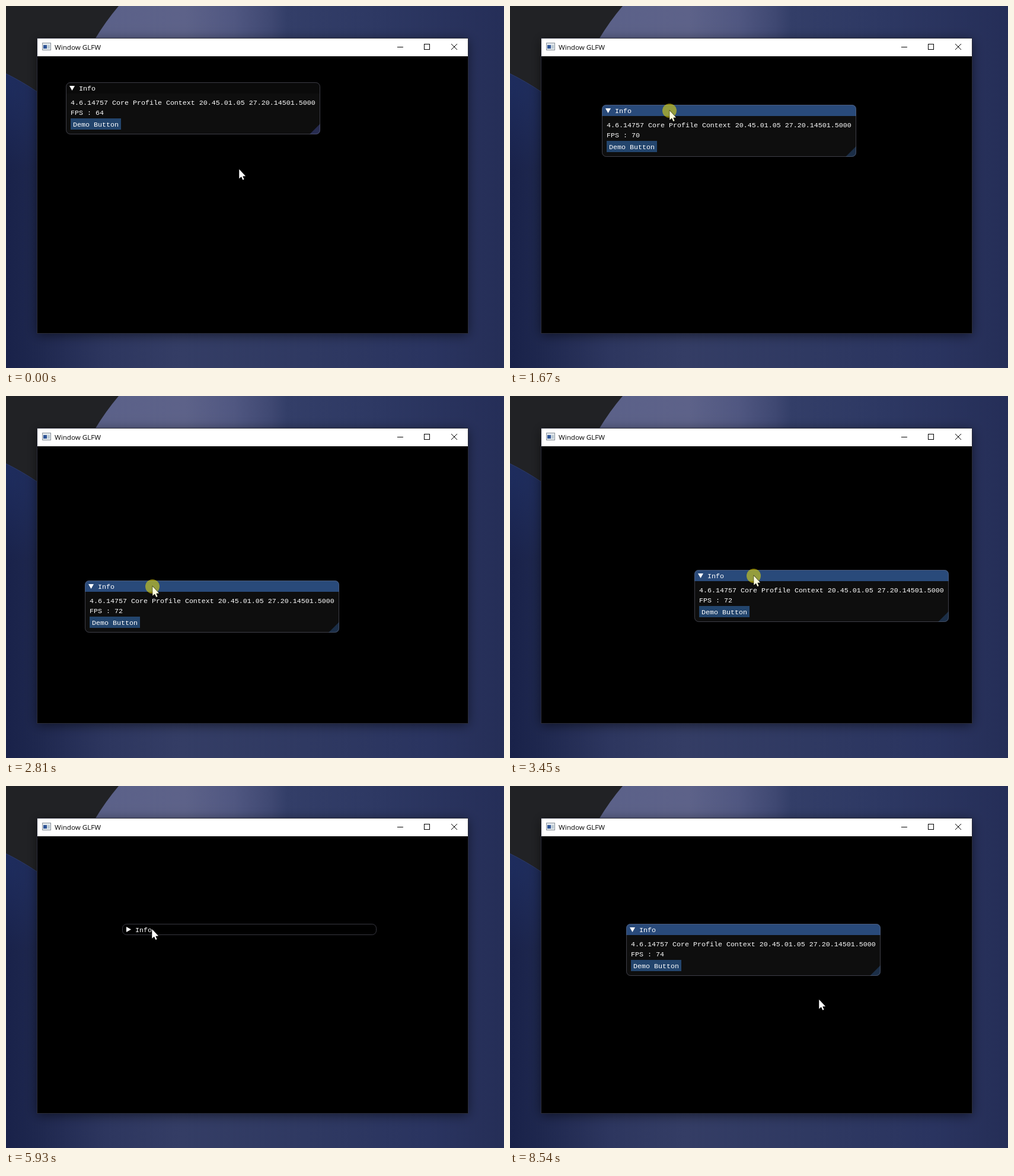
Animation of 840 by 612 pixels, one loop 8590 ms. Source, as an HTML page with a canvas:

```html
<!DOCTYPE html>
<html lang="en">
<head>
<meta charset="utf-8">
<title>Window GLFW</title>
<style>
html, body { margin: 0; width: 100%; height: 100%; overflow: hidden; background: #000; }
canvas { display: block; width: 840px; height: 612px; }
</style>
</head>
<body>
<canvas id="stage" width="840" height="612"></canvas>
<script>
const g = document.getElementById('stage').getContext('2d');
const LOOP = 8590, STEP = LOOP / 135, LEAD = 7;
const MONO = '11.667px "Liberation Mono", monospace';

// Turning points of the pointer: time, x, y
const turns = [
  [0, 393, 276], [760, 215, 139], [960, 215, 139], [1340, 374, 159],
  [1661, 269, 177], [2060, 414, 154], [2807, 247, 322], [2950, 274, 336],
  [3443, 411, 304], [3590, 411, 297], [4350, 322, 296], [5240, 322, 296],
  [5430, 371, 297], [5890, 256, 243], [6080, 206, 241], [6190, 206, 241],
  [6420, 262, 298], [6879, 270, 303], [8150, 269, 304], [8370, 400, 392],
  [8533, 521, 361]
];
const firstDrag = { from: 820, to: 3600 };
const secondDrag = { from: 5430, to: 5890 };
const collapseClick = { from: 5110, to: 5225 };
const expandClick = { from: 6090, to: 6190 };
const holds = [firstDrag, secondDrag, collapseClick, expandClick];
const taps = { from: 6560, to: 8100, every: 295, hold: 90 };

const during = (t, span) => t >= span.from && t < span.to;
const clamp = (v, lo, hi) => Math.min(hi, Math.max(lo, v));

// Monotone cubic through the points, without overshoot
function follow(keys, t) {
  const last = keys.length - 1;
  if (t >= keys[last][0]) return keys[last].slice(1);
  const i = keys.findIndex(k => k[0] > t) - 1;
  const slope = (k, c) => (keys[k + 1][c] - keys[k][c]) / (keys[k + 1][0] - keys[k][0]);
  const tangent = (k, c) => {
    if (k === 0 || k === last) return 0;
    const a = slope(k - 1, c), b = slope(k, c);
    return a * b <= 0 ? 0 : 2 * a * b / (a + b);
  };
  const h = keys[i + 1][0] - keys[i][0], u = (t - keys[i][0]) / h;
  return [1, 2].map(c => {
    const p = keys[i][c], q = keys[i + 1][c];
    return Math.round(p + (q - p) * u * u * (3 - 2 * u)
      + h * u * (1 - u) * ((1 - u) * tangent(i, c) - u * tangent(i + 1, c)));
  });
}

// The panel hangs on the pointer during a drag and rests otherwise
function panelAt(t) {
  if (t < firstDrag.from) return panelAt(firstDrag.from);
  const second = t >= secondDrag.from;
  const held = Math.min(t, second ? secondDrag.to : firstDrag.to);
  const [x, y] = follow(turns, held);
  const grab = second ? 60 : 114 - 14 * clamp((held - 2807) / 636, 0, 1);
  return [Math.round(x - grab), y - 10];
}

function isDown(t) {
  return holds.some(span => during(t, span))
    || during(t, taps) && (t - taps.from) % taps.every < taps.hold;
}

const fpsAt = t => Math.round(64 + 10 * t / LOOP + 4.6 * Math.max(0, Math.sin(Math.PI * t / 5000)));

function rect(c, x, y, w, h, fill) {
  c.fillStyle = fill;
  c.fillRect(x, y, w, h);
}

function label(str, x, y) {
  g.font = MONO;
  g.fillStyle = '#fff';
  g.fillText(str, x, y);
}

function poly(points, x, y, fill, stroke) {
  g.beginPath();
  points.forEach(p => g.lineTo(x + p[0], y + p[1]));
  g.closePath();
  if (stroke) {
    g.strokeStyle = stroke;
    g.lineWidth = 1.2;
    g.stroke();
  }
  g.fillStyle = fill;
  g.fill();
}

function disc(x, y, r, fill) {
  g.beginPath();
  g.arc(x, y, r, 0, Math.PI * 2);
  g.fillStyle = fill;
  g.fill();
}

function stops(grad, list) {
  list.forEach(s => grad.addColorStop(s[0], s[1]));
  return grad;
}

function drawDesktop(c) {
  rect(c, 0, 0, 840, 612, stops(c.createLinearGradient(0, 0, 840, 0), [
    [0, '#19224a'], [0.06, '#1e274e'], [0.2, '#2d365f'], [0.35, '#343d65'],
    [0.6, '#2f3962'], [0.85, '#2a3460'], [1, '#252e57']
  ]));
  rect(c, 150, 0, 690, 56, stops(c.createLinearGradient(150, 0, 840, 0), [
    [0, '#5b6189'], [0.22, '#5d6289'], [0.34, '#505781'], [0.43, '#3f4872'],
    [0.47, '#333e68'], [0.7, '#2d3863'], [1, '#252e58']
  ]));
  rect(c, 0, 100, 54, 200, stops(c.createRadialGradient(0, 130, 0, 0, 130, 150), [
    [0, 'rgba(34,54,112,.5)'], [1, 'rgba(34,54,112,0)']
  ]));

  c.beginPath();
  c.moveTo(0, 0);
  c.lineTo(190, 0);
  c.quadraticCurveTo(168, 26, 150, 56);
  c.lineTo(54, 146);
  c.quadraticCurveTo(26, 127, 0, 114);
  c.closePath();
  c.fillStyle = '#212225';
  c.fill();
  c.beginPath();
  c.moveTo(0, 114.5);
  c.quadraticCurveTo(26, 127, 54, 146);
  c.strokeStyle = '#2c3a68';
  c.lineWidth = 1;
  c.stroke();
}

function drawFrame(c) {
  c.save();
  c.shadowColor = 'rgba(0,0,0,.55)';
  c.shadowBlur = 18;
  c.shadowOffsetY = 3;
  rect(c, 53, 55, 726, 498, '#000');
  c.restore();
  c.lineWidth = 1;
  c.strokeStyle = '#2b2d3a';
  c.strokeRect(52.5, 54.5, 727, 499);
  rect(c, 53, 55, 726, 30, '#fff');

  // window icon
  rect(c, 61, 62, 15, 13, '#8a939c');
  rect(c, 62, 63, 13, 11, '#e3e8ec');
  rect(c, 63, 66, 6, 6, '#2f5597');
  rect(c, 70, 66, 4, 6, '#bccad2');

  c.font = '11.6px "Open Sans", sans-serif';
  c.fillStyle = '#000';
  c.fillText('Window GLFW', 82, 74);

  rect(c, 660, 69, 10, 1, '#000');
  c.strokeStyle = '#000';
  c.strokeRect(705.5, 64.5, 9, 9);
  c.beginPath();
  c.moveTo(751, 64);
  c.lineTo(761, 74);
  c.moveTo(761, 64);
  c.lineTo(751, 74);
  c.stroke();
}

function drawPanel(x, y, s) {
  const h = s.collapsed ? 19 : 88;
  g.save();
  g.beginPath();
  g.roundRect(x, y, 429, h, 7);
  g.clip();
  if (s.collapsed) {
    rect(g, x, y, 429, h, '#000');
  } else {
    rect(g, x, y, 429, h, '#0e0e0e');
    rect(g, x, y, 429, 19, s.focused ? '#294a7a' : '#0a0a0a');
    poly([[429, 70], [429, 88], [411, 88]], x, y, s.focused ? '#1b2e47' : '#262b50');
  }
  g.restore();
  g.beginPath();
  g.roundRect(x + 0.5, y + 0.5, 428, h - 1, 7);
  g.strokeStyle = 'rgba(110,110,128,.5)';
  g.lineWidth = 1;
  g.stroke();

  if (s.onArrow) disc(x + 10.5, y + 9.5, 7.5, s.down ? '#0f87fa' : '#4296fa');
  poly(s.collapsed ? [[7, 5], [15, 9.5], [7, 14]] : [[6, 6], [15, 6], [10.5, 14]], x, y, '#fff');
  label('Info', x + 22, y + 14);
  if (s.collapsed) return;

  label('4.6.14757 Core Profile Context 20.45.01.05 27.20.14501.5000', x + 8, y + 38);
  label('FPS : ' + s.fps, x + 8, y + 55);
  rect(g, x + 8, y + 61, 85, 19, !s.onButton ? '#23456d' : s.down ? '#0f87fa' : '#4296fa');
  label('Demo Button', x + 12, y + 75);
}

function drawPointer(x, y, down) {
  if (down) disc(x, y, 12, 'rgba(255,240,0,.5)');
  poly([[0, 0], [0, 15.8], [3.6, 12.6], [6.1, 18], [8.3, 17], [6, 11.7], [10.8, 11.4]],
    x + 0.3, y, down ? '#ffffdf' : '#fff', 'rgba(0,0,0,.75)');
}

const backdrop = document.createElement('canvas');
backdrop.width = 840;
backdrop.height = 612;
drawDesktop(backdrop.getContext('2d'));
drawFrame(backdrop.getContext('2d'));

function draw(now) {
  const step = Math.max(0, Math.floor((now % LOOP - LEAD) / STEP));
  const t = step ? step * STEP + LEAD : 0;

  const [x, y] = panelAt(t);
  const [px, py] = follow(turns, t);
  const over = (left, top, right, bottom) =>
    px >= x + left && px < x + right && py >= y + top && py < y + bottom;
  const down = isDown(t);
  const collapsed = t >= collapseClick.to && t < expandClick.to;

  g.drawImage(backdrop, 0, 0);
  drawPanel(x, y, {
    down, collapsed,
    focused: t >= firstDrag.from,
    fps: fpsAt(t),
    onArrow: over(3, 2, 18, 17),
    onButton: over(8, 61, 93, 80)
  });
  drawPointer(px, py, down);
}

let start = null;
function tick(now) {
  if (start === null) start = now;
  draw(now - start);
  requestAnimationFrame(tick);
}
draw(0);
requestAnimationFrame(tick);
</script>
</body>
</html>
```
